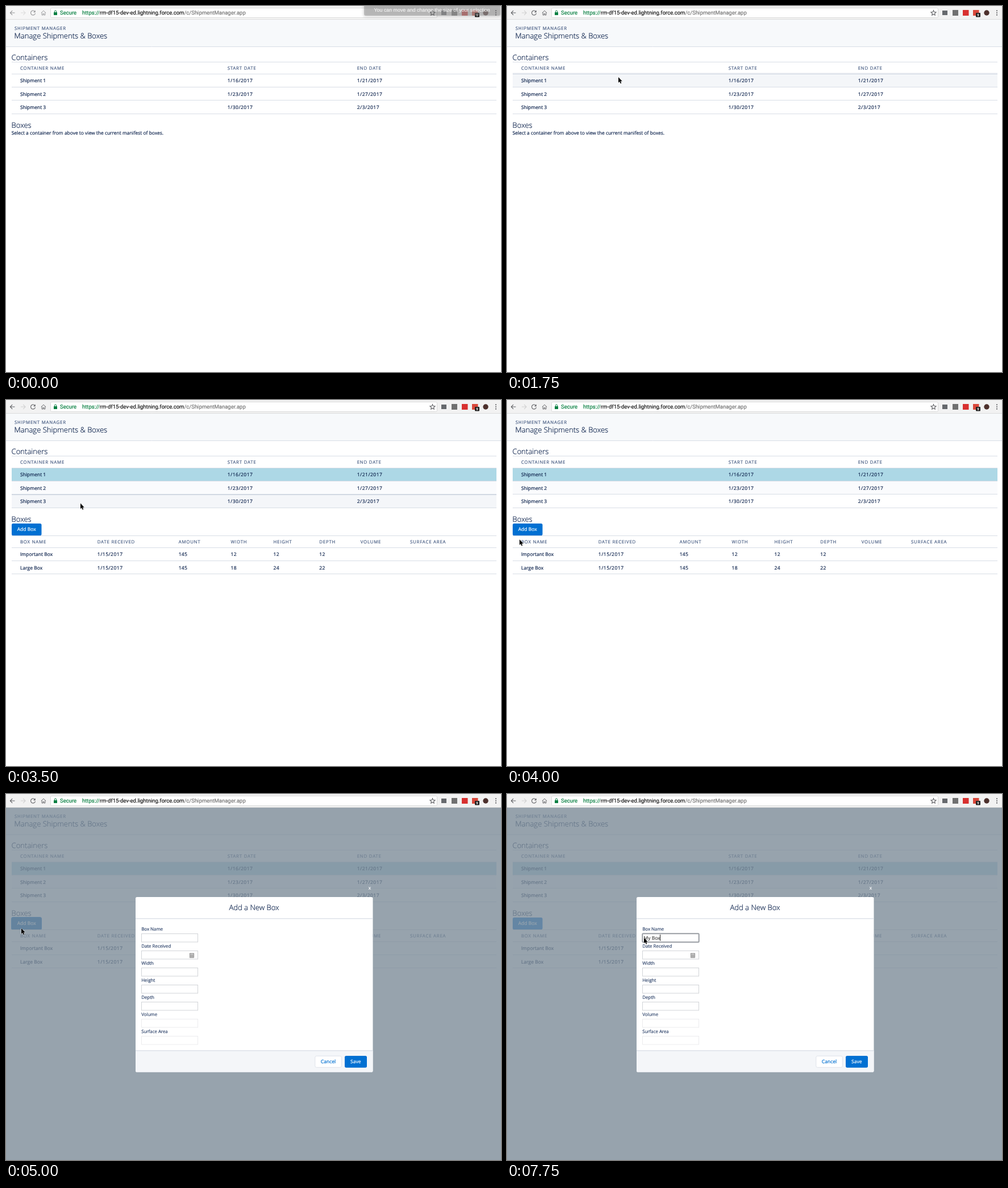
Write an HTML page that moves like this. It is 871 by 643 pixels and loops after 8000 ms.

```html
<!DOCTYPE html>
<html lang="en">
<head>
<meta charset="utf-8">
<title>Shipment Manager</title>
<style>
html, body { margin: 0; width: 100%; height: 100%; overflow: hidden; background: #fff; }
svg { display: block; width: 871px; height: 643px; }
text {
  font: 8.5px "Open Sans", "Noto Sans", sans-serif;
  color: #10264f; fill: currentColor; stroke: currentColor; stroke-width: .2;
  white-space: pre; text-rendering: geometricPrecision;
}
.big { font-size: 13.05px; font-weight: 300; }
.cap { font-size: 7.8px; letter-spacing: .8px; color: #4a5f85; }
.date { letter-spacing: .5px; }
.num { letter-spacing: .3px; }
.label { font-size: 7.9px; color: #34496f; }
.body { font-size: 8.45px; }
.mid { text-anchor: middle; }
.white { color: #fff; }
.blue { color: #0070d2; }
.bar { font: 9.5px Roboto, sans-serif; }
.secure { color: #0b8043; }
.host { color: #1c1c1c; }
.path { color: #777; }
.note { font: 8.85px "Liberation Sans", sans-serif; stroke: none; }
.badge { font: bold 6px Roboto, sans-serif; stroke: none; }
.line { stroke: #d8dde6; }
.icon { fill: none; stroke: #5f6064; stroke-width: 1.1; }

/* Every state holds until its next hard change: 1% = 80 ms */
.t, .cursor, .caret, .typed tspan { animation: 8s step-end infinite; }
.late { opacity: 0; }
.tip { animation-name: tip; }
.idle { opacity: .65; animation-name: idle; }
.idlebar { animation-name: idlebar; }
.hover1 { animation-name: hover1; }
.prompt { animation-name: prompt; }
.boxes { animation-name: boxes; }
.picked { animation-name: picked; }
.hover3 { animation-name: hover3; }
.press { animation-name: press; }
.ring { animation-name: ring; }
.modal { animation-name: modal; }
.focus { animation-name: focus; }
.typed { color: #111; stroke: none; }
.typed tspan { fill-opacity: 0; }
.typed tspan:nth-child(1) { animation-name: key1; }
.typed tspan:nth-child(2) { animation-name: key2; }
.typed tspan:nth-child(3) { animation-name: key3; }
.typed tspan:nth-child(4) { animation-name: key4; }
.caret { opacity: 0; animation-name: caret; }
.cursor { opacity: 0; animation-name: cursor; }

@keyframes tip { 3.125% { opacity: 0 } }
@keyframes idle { 18.75% { opacity: 1 } }
@keyframes idlebar { 18.75% { opacity: 0 } }
@keyframes hover1 { 21.875% { opacity: 1 } 43.75% { opacity: 0 } }
@keyframes prompt { 34.375% { opacity: 0 } }
@keyframes boxes { 34.375% { opacity: 1 } }
@keyframes picked { 43.75% { opacity: 1 } }
@keyframes hover3 { 43.75% { opacity: 1 } 46.875% { opacity: 0 } }
@keyframes press { 56.25% { opacity: 1 } 78.125% { opacity: 0 } }
@keyframes ring { 62.5% { opacity: 1 } 78.125% { opacity: 0 } }
@keyframes modal { 62.5% { opacity: 1 } }
@keyframes focus { 78.125% { opacity: 1 } }
@keyframes key1 { 87.5% { fill-opacity: 1 } }
@keyframes key2 { 90.625% { fill-opacity: 1 } }
@keyframes key3 { 93.75% { fill-opacity: 1 } }
@keyframes key4 { 96.875% { fill-opacity: 1 } }
@keyframes caret {
  78.125% { opacity: 1; transform: none }
  81.25% { opacity: 0 }
  87.5% { opacity: 1; transform: translateX(8px) }
  90.625% { opacity: 1; transform: translateX(14.5px) }
  93.75% { opacity: 1; transform: translateX(20px) }
  96.875% { opacity: 1; transform: translateX(29px) }
}
@keyframes cursor {
  6.25% { opacity: 1; transform: translate(385px, 94px) }
  12.5% { opacity: 1; transform: translate(213px, 117px) }
  21.875% { opacity: 1; transform: translate(196px, 125px) }
  25% { opacity: 1; transform: translate(191px, 134px) }
  43.75% { opacity: 1; transform: translate(131px, 181.5px) }
  46.875% { opacity: 1; transform: translate(91px, 209px) }
  50% { opacity: 1; transform: translate(22px, 245px) }
  53.125% { opacity: 1; transform: translate(23px, 244px) }
  56.25% { opacity: 1; transform: translate(25px, 237px) }
  59.375% { opacity: 1; transform: translate(27px, 236px) }
  68.75% { opacity: 1; transform: translate(125px, 257px) }
  71.875% { opacity: 1; transform: translate(223px, 252px) }
  75%, 100% { opacity: 1; transform: translate(241px, 252.5px) }
}
</style>
</head>
<body>
<svg viewBox="0 0 871 643">
  <defs>
    <filter id="soft" x="-10%" y="-60%" width="120%" height="260%"><feGaussianBlur stdDeviation="2.5"/></filter>
  </defs>

  <!-- browser bar -->
  <rect width="871" height="24" fill="#f2f2f2"/>
  <rect class="t idlebar" width="871" height="24" fill="#f6f6f6"/>
  <path d="M0 23.5H871" stroke="#dcdcdc"/>
  <rect x="78.5" y="3.5" width="680" height="17" rx="2" fill="#fff" stroke="#d9d9d9"/>
  <g class="icon t idle">
    <path d="M15.5 12H7.5M11.2 8.2L7.4 12l3.8 3.8"/>
    <path d="M26 12h8M30.3 8.2l3.8 3.8-3.8 3.8" stroke="#d0d0d0"/>
    <path d="M50.6 9.4A4 4 0 1 0 51.5 12.8"/>
    <path d="M51.7 7.6v3.6H48.1z" fill="#5f6064" stroke="none"/>
    <path d="M61.8 12.2L66 8.2l4.2 4M63.2 11.5V16h2v-2.6h1.6V16h2V11.5" stroke-width=".9"/>
  </g>
  <path class="icon" d="M750.5 7.6l1.3 3 3.2.3-2.4 2.1.7 3.2-2.8-1.7-2.8 1.7.7-3.2-2.4-2.1 3.2-.3z"/>
  <rect x="84" y="11" width="6" height="5" rx=".6" fill="#0b8043"/>
  <path d="M85.3 11.2V9.8a1.7 1.7 0 0 1 3.4 0v1.4" fill="none" stroke="#0b8043"/>
  <text class="bar secure" x="95" y="15.4">Secure</text>
  <text class="bar" x="134" y="15.4"><tspan class="secure">https://</tspan><tspan class="host">rm-df15-dev-ed.lightning.force.com</tspan><tspan class="path">/c/ShipmentManager.app</tspan></text>
  <g class="t idle">
    <rect x="766" y="8" width="9" height="8" fill="#66696d"/>
    <rect x="784" y="7" width="10" height="10" fill="#707070"/>
    <rect x="802" y="7" width="10.5" height="10" fill="#d8302f"/>
    <rect x="820" y="7" width="10.5" height="10" fill="#d9483b"/>
    <circle cx="844" cy="12" r="4.7" fill="#4d302c"/>
  </g>
  <rect x="825" y="12" width="8" height="7.5" rx="1" fill="#222"/>
  <text class="badge mid white" x="829" y="18">9</text>
  <g fill="#5f6064"><circle cx="862" cy="8.3" r="1.1"/><circle cx="862" cy="12" r="1.1"/><circle cx="862" cy="15.7" r="1.1"/></g>
  <g class="t tip">
    <rect x="629" y="-6" width="242" height="25" rx="3" opacity=".15" filter="url(#soft)"/>
    <rect x="630" y="-5" width="240" height="22" rx="3" fill="#808080" opacity=".4"/>
    <text class="note white" x="647.5" y="9.6">You can move and change the size of your selection</text>
  </g>

  <!-- page -->
  <rect y="24" width="871" height="47" fill="#f7f9fb"/>
  <path class="line" d="M0 71.5H871"/>
  <text class="cap" x="15" y="42.4">SHIPMENT MANAGER</text>
  <text class="big" x="14.6" y="56.7">Manage Shipments &amp; Boxes</text>
  <text class="big" x="9.6" y="94.7">Containers</text>
  <rect class="t late picked" x="10" y="143" width="853" height="23" fill="#fafbfd"/>
  <g id="containers"></g>
  <text class="big" x="9.6" y="213.5">Boxes</text>
  <text class="body t prompt" x="9.7" y="226.4">Select a container from above to view the current manifest of boxes.</text>
  <g class="t late boxes">
    <rect class="t late ring" x="9" y="216" width="54" height="23" rx="3.5" fill="#0070d2" opacity=".5"/>
    <rect x="10" y="217" width="52.5" height="21" rx="2.6" fill="#0070d2"/>
    <rect class="t late press" x="10" y="217" width="52.5" height="21" rx="2.6" fill="#005fb2"/>
    <text class="mid white" x="36.2" y="230.4">Add Box</text>
    <g id="manifest"></g>
  </g>

  <!-- dialog -->
  <g class="t late modal">
    <rect y="24" width="871" height="619" fill="#7e8c99" opacity=".8"/>
    <text class="mid white" x="640" y="168">x</text>
    <rect x="228" y="181" width="417.5" height="307.5" rx="2.6" fill="#fff"/>
    <path d="M228 451H645.5V485.9a2.6 2.6 0 0 1-2.6 2.6H230.6a2.6 2.6 0 0 1-2.6-2.6z" fill="#f4f6f9"/>
    <path class="line" d="M228 218.8H645.5M228 450.8H645.5" stroke-width="1.3"/>
    <text class="big mid" x="436.5" y="204.3">Add a New Box</text>
    <g id="fields"></g>
    <g fill="none" stroke="#777" stroke-width=".8">
      <rect x="323.5" y="280" width="7" height="7.5"/>
      <path d="M323.5 281.2h7M325.8 282v5.5M328.2 282v5.5M323.5 283.6h7M323.5 285.5h7"/>
    </g>
    <rect x="543.8" y="460.3" width="46.5" height="20" rx="2.6" fill="#fff" stroke="#d8dde6" stroke-width=".8"/>
    <text class="mid blue" x="567" y="473.2">Cancel</text>
    <rect x="596" y="460" width="39" height="20.7" rx="2.6" fill="#0070d2"/>
    <text class="mid white" x="615.3" y="473.2">Save</text>
    <rect class="t late focus" x="238.3" y="245.3" width="99.4" height="14.9" rx="1.2" fill="#fff" stroke="#999da3" stroke-width="2"/>
    <text class="body typed" x="240.6" y="255.8"><tspan>M</tspan><tspan>y </tspan><tspan>B</tspan><tspan>ox</tspan></text>
    <rect class="caret" x="240" y="247" width="1" height="11" fill="#222"/>
  </g>

  <path class="cursor" d="M0 0V9.8L2.2 7.8 3.7 11.3 5.3 10.6 3.8 7.2H6.8Z" stroke="#fff" stroke-width=".8" paint-order="stroke"/>
</svg>
<script>
const put = (id, html) => { document.getElementById(id).innerHTML = html; };
const text = (x, y, s, cls = "") => `<text class="${cls}" x="${x}" y="${y}">${s}</text>`;
const line = y => `<path class="line" d="M10 ${y}H863"/>`;
const kind = s => s.includes("/") ? "date" : isNaN(s) ? "" : "num";
const rowTop = (top, r) => Math.round(top + 21.4 + r * 23.5);

const header = (top, xs, heads) => line(top + .5) + line(top + 21.5) +
  heads.map((h, i) => text(xs[i], top + 13.8, h, "cap")).join("");

const body = (top, xs, rows) => rows.map((row, r) =>
  line(rowTop(top, r + 1) - .5) +
  row.map((s, i) => text(xs[i], top + 36.3 + r * 23.5, s, kind(s))).join("")).join("");

const hover = (y, cls) => `<g class="t late ${cls}"><rect x="10" y="${y}" width="853" height="23" fill="#f4f6f9"/>
  <path d="M10 ${y + .5}h853M10 ${y + 23.5}h853" stroke="#cbd3df"/></g>`;

const dates = [25, 389.7, 617.7];
put("containers",
  `<rect class="t late hover1" x="10" y="117" width="853" height="3" fill="#f0f2f6"/>` +
  header(98, dates, ["CONTAINER NAME", "START DATE", "END DATE"]) +
  hover(119, "hover1") + hover(166, "hover3") +
  `<rect class="t late picked" x="10" y="120" width="853" height="23" fill="#add8e6"/>` +
  body(98, dates, [
    ["Shipment 1", "1/16/2017", "1/21/2017"],
    ["Shipment 2", "1/23/2017", "1/27/2017"],
    ["Shipment 3", "1/30/2017", "2/3/2017"]
  ]));

const sizes = [25, 160.8, 303.7, 395.5, 470.5, 551.3, 623.7, 711];
put("manifest",
  header(238, sizes, ["BOX NAME", "DATE RECEIVED", "AMOUNT", "WIDTH", "HEIGHT", "DEPTH", "VOLUME", "SURFACE AREA"]) +
  body(238, sizes, [
    ["Important Box", "1/15/2017", "145", "12", "12", "12"],
    ["Large Box", "1/15/2017", "145", "18", "24", "22"]
  ]));

put("fields", ["Box Name", "Date Received", "Width", "Height", "Depth", "Volume", "Surface Area"]
  .map((s, i) => text(238.2, 239.6 + i * 30, s, "label") +
    `<rect x="238.5" y="${245.5 + i * 30}" width="99" height="14.5" fill="#fff" stroke="${i < 5 ? "#d2d4d8" : "#ececee"}"/>`)
  .join(""));
</script>
</body>
</html>
```
